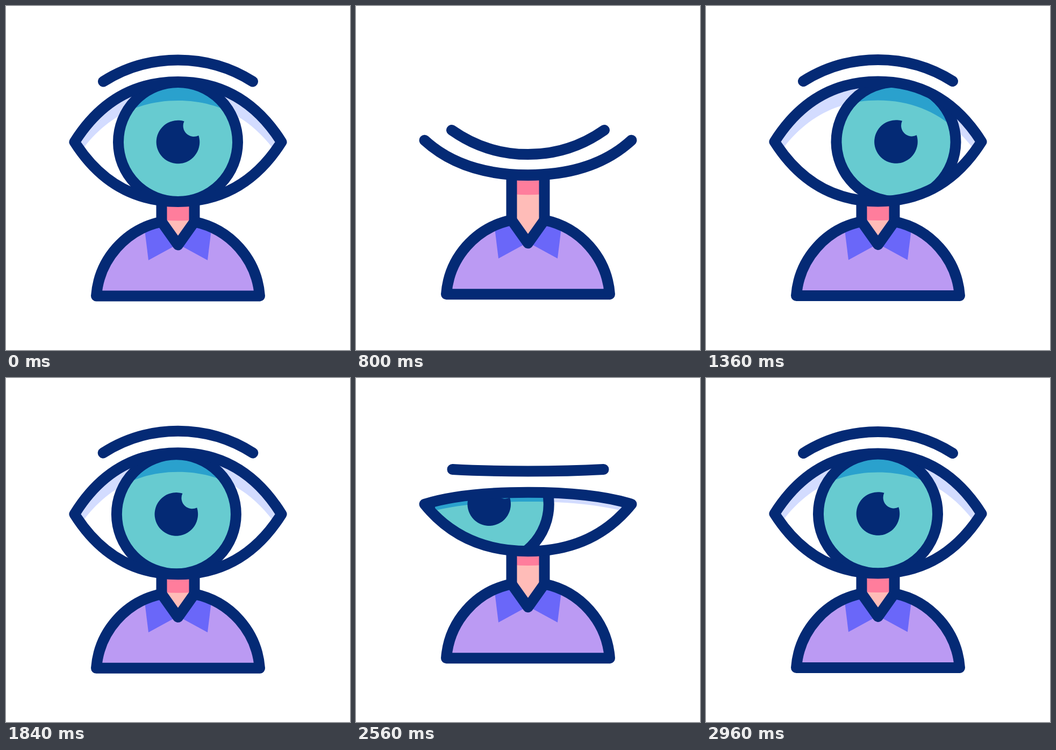
Recreate the animation shown at these times as an HTML page. Size 640x640 px, loop 3000 ms.

```html
<!DOCTYPE html>
<html lang="en">
<head>
<meta charset="utf-8">
<title>Blinking eye</title>
<style>
  html, body { margin: 0; width: 100%; height: 100%; overflow: hidden; background: #fff; }
  svg { display: block; width: 100%; height: 100%; }
  .line { fill: none; stroke: #042a75; stroke-width: 20; stroke-linecap: round; stroke-linejoin: round; }
  .butt { stroke-linecap: butt; }
</style>
</head>
<body>
<svg viewBox="0 0 640 640">
  <defs>
    <clipPath id="eyeClip"><path id="eyeShape"/></clipPath>
    <clipPath id="irisClip"><circle id="irisEdge" cy="253" r="111"/></clipPath>
    <path id="torso" d="M168 539.5A152.5 152.5 0 0 1 289.5 401.5L320 444.5 350.5 401.5A152.5 152.5 0 0 1 472 539.5Z"/>
    <path id="collar" d="M257 408L265 473 320 443 289 400Z"/>
    <rect id="backdrop" width="640" height="640"/>
  </defs>
  <g id="figure">
    <path id="neck" fill="#ffbcb8"/>
    <path id="neckShade" fill="#ff7d9c"/>
    <path id="neckSides" class="line butt"/>
    <use href="#torso" fill="#bb9af3"/>
    <g fill="#6a67f9">
      <use href="#collar"/>
      <use href="#collar" transform="matrix(-1 0 0 1 640 0)"/>
    </g>
    <use href="#torso" class="line"/>
    <g clip-path="url(#eyeClip)">
      <use href="#backdrop" fill="#fff"/>
      <path id="whiteShade" fill="#d3dcff"/>
      <g clip-path="url(#irisClip)">
        <use href="#backdrop" fill="#67cbd0"/>
        <path id="irisShade" fill="#2aa1cd"/>
      </g>
      <g id="iris">
        <circle class="line" r="111"/>
        <path fill="#042a75" d="M11.5 -38.6A40.3 40.3 0 1 0 38.4 -12.1A20 20 0 0 1 11.5 -38.6Z"/>
      </g>
    </g>
    <path id="lids" class="line"/>
    <path id="brow" class="line"/>
  </g>
</svg>
<script>
const LOOP = 3000, STEP = 40;
const MID_X = 320, EYE_Y = 253, LID_X = 127.5, GAZE = 111.5;
const $ = id => document.getElementById(id);
const draw = (id, d) => $(id).setAttribute('d', d);

const ease = (t, from, to) => {
  const s = Math.min(1, Math.max(0, (t - from) / (to - from)));
  return s * s * (3 - 2 * s);
};

// Heights relative to the eye's centre line: rest, wide open, closed.
const POSES = {
  upper: [-112, -142, 65],
  lower: [111, 124, 65],
  browX: [181, 177, 178],
  browEnd: [-112.5, -132.6, -18.5],
  browTop: [-152.5, -182, 27],
  shade: [35, 43, 0],
  neckShade: [145, 148, 100]
};

// Handle proportions: reach and rise at the ends, flat at the apex.
const LID = { reach: .22, rise: .6, flat: .46 };
const BROW = { reach: .29, rise: .64, flat: .37 };

// A symmetric arch from (x, end) over its apex, continued from the current point.
function arch(x, end, apex, { reach, rise, flat }, dir = 1) {
  const half = (MID_X - x) * dir;
  const knee = end + (apex - end) * rise;
  const left = MID_X - half, right = MID_X + half;
  return `${left} ${end}C${left + half * reach} ${knee} ${MID_X - half * flat} ${apex} ${MID_X} ${apex}`
    + `S${right - half * reach} ${knee} ${right} ${end}`;
}

// Pose values at time p of a blink: open wide, shut, then relax.
function blink(p) {
  const widen = ease(p, 0, 243), shut = ease(p, 243, 423), relax = ease(p, 588, 936);
  const pose = {};
  for (const [name, [rest, wide, closed]] of Object.entries(POSES)) {
    const closing = rest + (wide - rest) * widen + (closed - wide) * shut;
    pose[name] = closing + (rest - closed) * relax;
  }
  return pose;
}

const bounce = p => 12.7 * ease(p, 0, 400) - 31.9 * ease(p, 400, 800) + 19.2 * ease(p, 800, 1200);

const gaze = t => GAZE * (ease(t, 200, 600) - ease(t, 800, 1680)
  - ease(t, 1800, 2200) + ease(t, 2400, 2800));

function render(t) {
  const p = t < 1800 ? t - 200 : t - 1800;
  const pose = blink(p);
  const upperY = EYE_Y + pose.upper, chin = EYE_Y + pose.lower;
  const shadeY = EYE_Y + pose.shade;
  const lids = `M${arch(LID_X, EYE_Y, upperY, LID)}L${arch(LID_X, EYE_Y, chin, LID, -1)}Z`;
  const shade = `M${arch(LID_X, shadeY, upperY + pose.shade, LID)}V0H${LID_X}Z`;
  const neckShade = EYE_Y + blink(p - 50).neckShade;
  const irisX = MID_X + gaze(t);

  $('figure').setAttribute('transform', `translate(0 ${bounce(p)})`);
  draw('eyeShape', lids);
  draw('lids', lids);
  draw('whiteShade', shade);
  draw('irisShade', shade);
  draw('brow', `M${arch(pose.browX, EYE_Y + pose.browEnd, EYE_Y + pose.browTop, BROW)}`);
  draw('neck', `M289.5 ${chin}H350.5V401.5L320 444.5 289.5 401.5Z`);
  draw('neckShade', `M289.5 ${chin}H350.5V${neckShade}Q320 ${neckShade + 3} 289.5 ${neckShade}Z`);
  draw('neckSides', `M289.5 ${chin}V402M350.5 ${chin}V402`);
  $('irisEdge').setAttribute('cx', irisX);
  $('iris').setAttribute('transform', `translate(${irisX} ${EYE_Y})`);
}

const start = performance.now();
function tick() {
  const t = (performance.now() - start) % LOOP;
  render(Math.floor(t / STEP) * STEP);
  requestAnimationFrame(tick);
}
tick();
</script>
</body>
</html>
```
